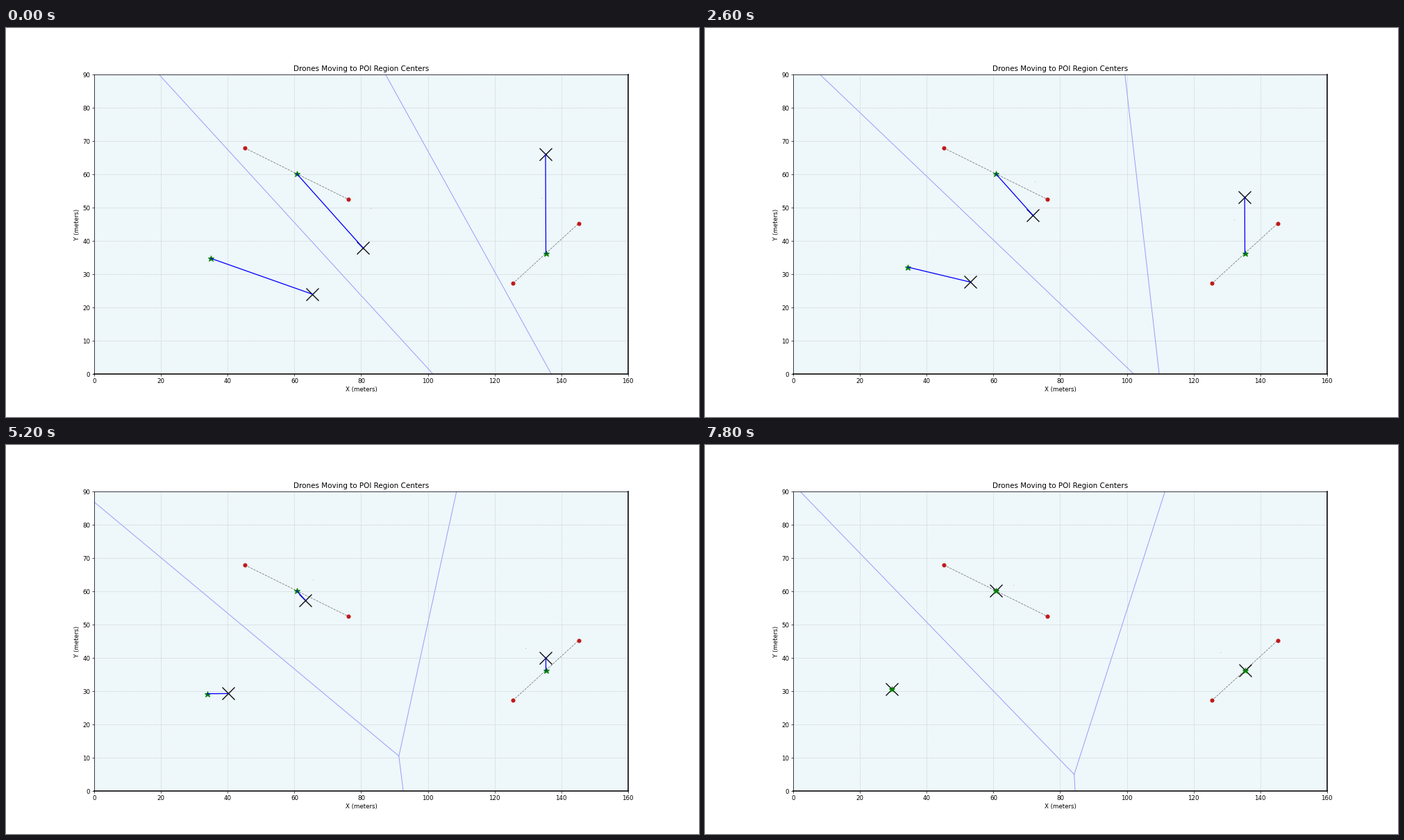
Animation, 998 px wide and 561 px high, one loop 8000 ms. Source, as a matplotlib script:

```python
import numpy as np
import matplotlib.pyplot as plt
from matplotlib.animation import FuncAnimation

W, H, DPI = 998, 561, 62.375
FRAMES, INTERVAL = 40, 200
AREA = np.array([[0, 0], [160, 0], [160, 90], [0, 90]], float)
STEP = 1.0  # metres per frame

START = np.array([[66.37, 23.69], [81.2, 37.23], [135.28, 67.1]])
POIS = {
    1: np.array([[45.15, 67.95], [76.25, 52.5]]),
    2: np.array([[125.5, 27.25], [145.28, 45.37]]),
}


def clip(poly, normal, limit):
    """Keep the part of poly where normal . p <= limit."""
    out = []
    side = poly @ normal - limit
    for i in range(len(poly)):
        j = (i + 1) % len(poly)
        if side[i] <= 0:
            out.append(poly[i])
        if side[i] * side[j] < 0:
            t = side[i] / (side[i] - side[j])
            out.append(poly[i] + t * (poly[j] - poly[i]))
    return np.array(out)


def voronoi_cell(k, points):
    poly = AREA
    for j, other in enumerate(points):
        if j != k:
            normal = other - points[k]
            poly = clip(poly, normal, normal @ (other + points[k]) / 2)
    return poly


def centroid(poly):
    nxt = np.roll(poly, -1, axis=0)
    cross = poly[:, 0] * nxt[:, 1] - nxt[:, 0] * poly[:, 1]
    return ((poly + nxt) * cross[:, None]).sum(axis=0) / (3 * cross.sum())


def advance(pos, goal):
    gap = goal - pos
    dist = np.hypot(*gap)
    return goal.copy() if dist <= STEP else pos + gap * STEP / dist


def simulate():
    states, pos = [], START
    for _ in range(FRAMES):
        cells = [voronoi_cell(k, pos) for k in range(3)]
        centers = np.array([centroid(c) for c in cells])
        goals = np.array([POIS[k].mean(axis=0) if k in POIS else centers[k]
                          for k in range(3)])
        pos = np.array([advance(p, g) for p, g in zip(pos, goals)])
        states.append((cells, centers, goals, pos))
    return states


states = simulate()

fig = plt.figure(figsize=(W / DPI, (H + 1e-6) / DPI), dpi=DPI, facecolor="white")
ax = fig.add_axes([0.1275, 0.11, 0.77, 0.77])
ax.set(xlim=(0, 160), ylim=(0, 90), facecolor="#eef7fa",
       title="Drones Moving to POI Region Centers")
ax.set_xlabel("X (meters)", labelpad=3)
ax.set_ylabel("Y (meters)")
ax.grid(True, linestyle=":", color="#b0b0b0")
for name in ("right", "bottom"):
    ax.spines[name].set_linewidth(1.8)

for pts in POIS.values():
    ax.plot(*pts.T, "--", color="gray", lw=1, zorder=2)
    ax.plot(*pts.T, "o", color="#c01818", ms=6, zorder=2.2)

borders = [ax.plot([], [], color="blue", alpha=0.22, lw=1, zorder=1.5)[0]
           for _ in range(3)]
dots, = ax.plot([], [], ",", color="gray", alpha=0.6, zorder=1.6)
drones, = ax.plot([], [], "x", color="black", ms=20, mew=1.5, zorder=2.3)
stars, = ax.plot([], [], "*", color="green", ms=10, zorder=2.4)
paths = [ax.plot([], [], color="blue", lw=1.5, zorder=2.5)[0] for _ in range(3)]


def update(i):
    cells, centers, goals, pos = states[i]
    for k in range(3):
        borders[k].set_data(*np.vstack([cells[k], cells[k][:1]]).T)
        paths[k].set_data(*np.array([pos[k], goals[k]]).T)
    dots.set_data(*centers.T)
    drones.set_data(*pos.T)
    stars.set_data(*goals.T)
    return [*borders, *paths, dots, drones, stars]


anim = FuncAnimation(fig, update, frames=FRAMES, interval=INTERVAL,
                     repeat=True, repeat_delay=0, blit=False)
plt.show()
```
